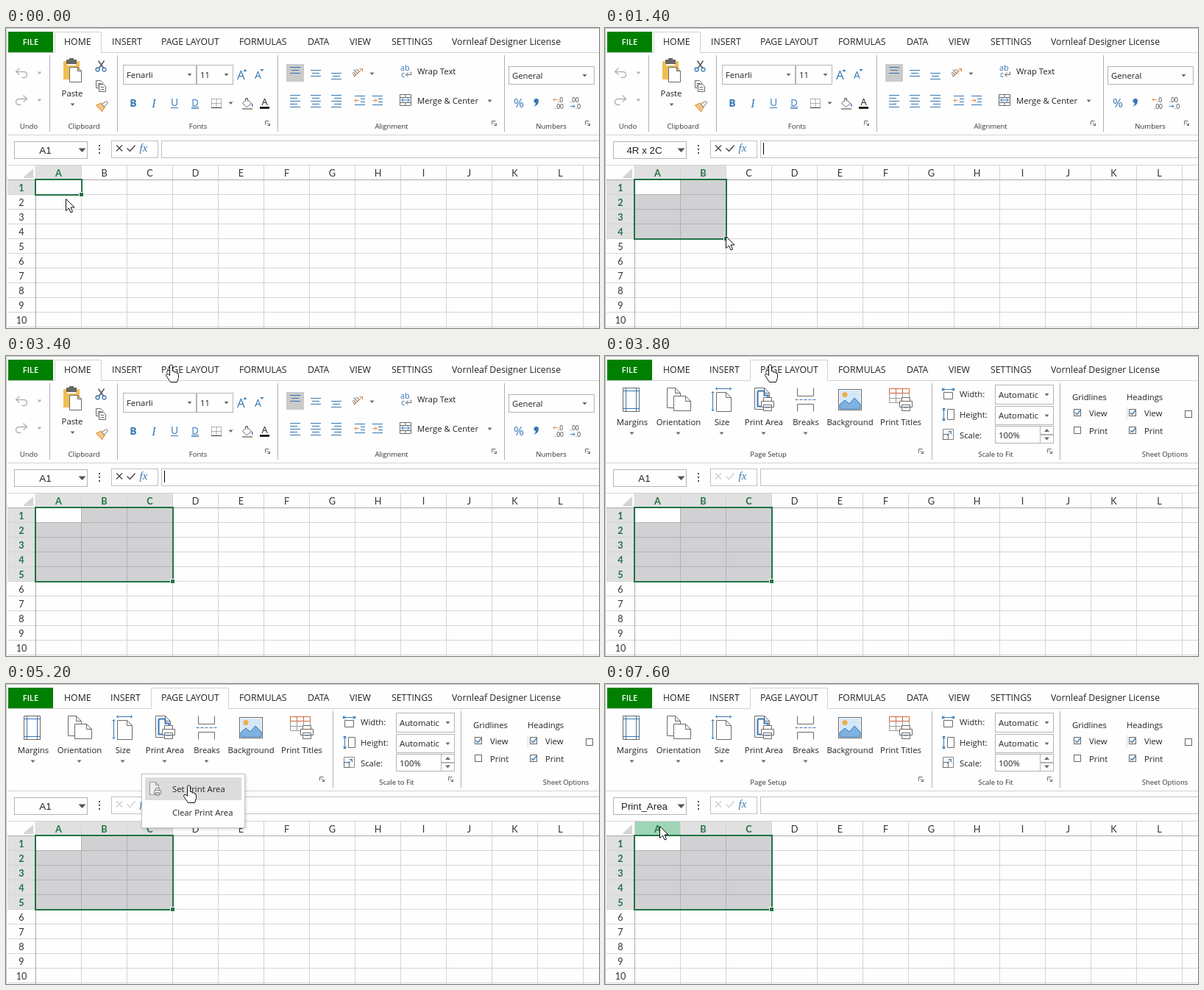
Write an HTML page with a canvas that moves like this. It is 806 px wide and 408 px high and loops after 7800 ms.

```html
<!DOCTYPE html>
<html lang="en">
<head>
<meta charset="utf-8">
<title>Spreadsheet print area</title>
<style>
html, body { margin: 0; width: 100%; height: 100%; overflow: hidden; background: #fefefe; }
canvas { display: block; }
</style>
</head>
<body>
<canvas id="stage" width="806" height="408"></canvas>
<script>
const ctx = document.getElementById('stage').getContext('2d');
const LOOP = 7800, STEP = 200;
const COL = 62, ROW = 20, LEFT = 41, TOP = 207;
const SANS = '"Open Sans", "Noto Sans", sans-serif';
const LATO = 'Lato, "Open Sans", sans-serif';
const ARIAL = '"Liberation Sans", Arial, sans-serif';
const SERIF = '"Liberation Serif", serif';
const BLUE = '#3977b4', GREY = '#6a6a6a', ORANGE = '#e58a3c', GREEN = '#217346';

// ---- helpers ----
function fill(x, y, w, h, color) {
  ctx.fillStyle = color;
  ctx.fillRect(x, y, w, h);
}
function box(x, y, w, h, stroke = '#b4b4b4', bg = '#fefefe') {
  fill(x, y, w, h, stroke);
  fill(x + 1, y + 1, w - 2, h - 2, bg);
}
function text(s, x, y, { size = 11.3, align = 'left', color = '#222', style = '', font = SANS } = {}) {
  ctx.font = `${style} ${size}px ${font}`;
  ctx.textAlign = align;
  ctx.fillStyle = color;
  ctx.fillText(s, x, Math.round(y + size * 0.357));
}
const center = (s, x, y, options) => text(s, x, y, { align: 'center', ...options });
function draw(d, x, y, stroke, bg, width = 1) {
  const path = new Path2D(d);
  ctx.save();
  ctx.translate(x, y);
  if (bg) { ctx.fillStyle = bg; ctx.fill(path); }
  if (stroke) { ctx.strokeStyle = stroke; ctx.lineWidth = width; ctx.stroke(path); }
  ctx.restore();
}
const arrowDown = (x, y, color = GREY, r = 3) => draw(`M${-r}-1.5H${r}L0 ${r - 1}Z`, x + 0.5, y, null, color);
const divider = x => fill(x, 37, 1, 104, '#b0b0b0');
const groupLabel = (s, x) => center(s, x, 134, { size: 9.5, color: '#333' });
const launcher = x => draw('M0 5V0H5M2 2L6 6M6 3V6H3', x - 3.5, 126.5, GREY);
function combo(s, x, y, w, h, inset = 10) {
  box(x, y, w, h);
  text(s, x + 5, y + h / 2);
  arrowDown(x + w - inset, y + h / 2);
}
function checkbox(x, y, checked) {
  box(x, y, 10, 10, '#666');
  if (checked) draw('M2 5L4.5 7.5L9 2', x, y, BLUE, null, 1.4);
}
const bars = (x, y, widths, align = 0, gap = 4, color = BLUE) =>
  widths.forEach((w, i) => fill(x + Math.round((14 - w) * align), Math.round(y + i * gap), w, 1, color));

// ---- ribbon ----
function tabs(layout) {
  fill(0, 0, 806, 1, '#bdbdbd');
  fill(0, 0, 1, 408, '#c4c4c4');
  fill(2, 33, 804, 1, '#d2d2d2');
  fill(3, 5, 61, 28, '#008000');
  center('FILE', 33.5, 19, { size: 11, style: '600', color: '#fff' });
  const [x, w] = layout ? [197, 106] : [66, 64];
  box(x, 5, w, 29, '#d2d2d2');
  fill(x + 1, 33, w - 2, 1, '#fefefe');
  [['HOME', 79], ['INSERT', layout ? 142 : 144], ['PAGE LAYOUT', 211], ['FORMULAS', 317], ['DATA', 410],
   ['VIEW', 467], ['SETTINGS', 524], ['Vornleaf Designer License', 606]]
    .forEach(([s, tx]) => text(s, tx, 19, { size: 12.3 }));
  fill(2, 145, 804, 1, '#d2d2d2');
}

function homeRibbon() {
  [59, 151, 369, 677].forEach(divider);
  [['Undo', 31], ['Clipboard', 106], ['Fonts', 261], ['Alignment', 524], ['Numbers', 741]]
    .forEach(g => groupLabel(...g));
  [356, 664, 791].forEach(launcher);

  // undo, redo
  draw('M5 0L0 5L5 9M0 5H10Q15 5 15 9T10 13H8', 13.5, 54.5, '#b4b4b4', null, 1.4);
  draw('M10 0L15 5L10 9M15 5H5Q0 5 0 9T5 13H7', 13.5, 91.5, '#b4b4b4', null, 1.4);
  arrowDown(45, 61, '#b4b4b4');
  arrowDown(45, 98, '#b4b4b4');

  // clipboard
  fill(78, 45, 22, 25, '#efbe55');
  fill(82, 43, 14, 6, '#666');
  fill(86, 41, 6, 3, '#666');
  fill(83, 49, 12, 2, '#fefefe');
  draw('M0 0H11L16 5V20H0ZM11 0V5H16', 86.5, 53.5, GREY, '#fefefe');
  center('Paste', 90, 89);
  arrowDown(90, 104);
  draw('M3 0L10 10M11 0L4 10', 122.5, 44.5, '#555', null, 1.5);
  draw('M5 12A2.5 2.5 0 1 1 0 12A2.5 2.5 0 1 1 5 12M14 12A2.5 2.5 0 1 1 9 12A2.5 2.5 0 1 1 14 12', 122, 44.5, BLUE, null, 1.3);
  for (const [x, y] of [[122.5, 71.5], [126.5, 76.5]])
    draw('M0 0H6L9 3V10H0ZM2 4H7M2 7H7', x, y, GREY, '#fefefe');
  draw('M0 6L7 3L12 8L8 15Z', 122.5, 99, ORANGE, '#f3c381');
  draw('M8 4L14 0L16 2L11 8Z', 122.5, 99.5, GREY, '#fefefe');

  // fonts
  combo('Fenarli', 159, 50, 100, 27);
  combo('11', 259, 50, 50, 27);
  text('A', 314, 64, { size: 17, color: BLUE });
  text('A', 338, 64, { size: 14, color: BLUE });
  draw('M-2.5 2L0-1L2.5 2Z', 325, 57, null, BLUE);
  draw('M-2.5-1L0 2L2.5-1Z', 348, 57, null, BLUE);
  const letter = { size: 14, color: BLUE };
  center('B', 173, 102, { ...letter, style: 'bold' });
  center('I', 201, 102, { ...letter, style: 'italic', font: SERIF, size: 16 });
  center('U', 229, 101, letter);
  center('D', 257, 101, { ...letter, size: 13 });
  fill(224, 108, 10, 1, BLUE);
  fill(252, 107, 10, 1, BLUE);
  fill(252, 109, 10, 1, BLUE);
  ctx.setLineDash([1, 1]);
  draw('M0 0H13V12M0 0V12M6.5 0V12M0 6H13', 279.5, 96.5, GREY);
  ctx.setLineDash([]);
  fill(279, 108, 14, 1, '#333');
  arrowDown(305, 102);
  draw('M1 7L7 1L13 7L7 12ZM5 4V0H8V4', 320.5, 95.5, GREY, '#fefefe');
  draw('M13 6Q17 10 14 12Z', 320.5, 95.5, null, BLUE);
  fill(321, 109, 14, 2, '#999');
  center('A', 351.5, 100, { size: 13 });
  fill(345, 107, 13, 3, '#222');

  // alignment
  fill(381, 49, 24, 24, '#cacaca');
  bars(386, 53, [14, 10, 14], 0.5);
  bars(414, 57, [14, 10, 14], 0.5);
  bars(442, 61, [14, 10, 14], 0.5);
  [0, 0.5, 1].forEach((a, i) => bars(386 + i * 28, 91, [14, 10, 14, 10, 14], a));
  ctx.save();
  ctx.translate(475, 62);
  ctx.rotate(-0.78);
  center('ab', 1, -2, { size: 10, color: GREY });
  ctx.restore();
  draw('M0 11L11 0M7 0H11V4', 473.5, 55.5, ORANGE);
  arrowDown(497, 62);
  for (const x of [474, 498]) {
    bars(x, 92, [14, 0, 0, 14]);
    bars(x + 8, 96, [6, 6]);
    draw(x === 474 ? 'M6 2.5H0M2.5 0L0 2.5L2.5 5' : 'M0 2.5H6M3.5 0L6 2.5L3.5 5', x, 96, ORANGE);
  }
  text('ab', 536, 54, { size: 11, color: BLUE });
  text('c', 537, 63, { size: 11, color: BLUE });
  draw('M7 0V4H0M3 1L0 4L3 7', 543.5, 59.5, GREY);
  draw('M0 0H15V15H0ZM0 4H15M0 11H15M7.5 0V4M7.5 11V15', 535.5, 90.5, GREY);
  draw('M2 7.5H13M5 5L2 7.5L5 10M10 5L13 7.5L10 10', 535.5, 90.5, BLUE);
  text('Wrap Text', 559, 59);
  text('Merge & Center', 559, 99);
  arrowDown(657, 99);

  // numbers
  combo('General', 683, 52, 117, 25, 14);
  text('%', 690, 102, { size: 17, color: BLUE });
  draw('M3 0A3 3 0 1 0 2 6Q2 9-1 11Q6 9 6 3Q6 0 3 0Z', 718, 96, null, BLUE);
  [744, 767].forEach((x, i) => {
    text(i ? '.00' : '.0', x + (i ? 0 : 6), 98, { size: 8.5, color: '#333' });
    text(i ? '.0' : '.00', x + (i ? 7 : 2), 107, { size: 8.5, color: '#333' });
    draw(i ? 'M0 2H6M4 0L6 2L4 4' : 'M6 2H0M2 0L0 2L2 4', x, i ? 104.5 : 95.5, i ? BLUE : ORANGE);
  });
}

const sheet = (x, y, w, h, f = 7) => draw(`M0 0H${w - f}L${w} ${f}V${h}H0ZM${w - f} 0V${f}H${w}`, x, y, GREY, '#fefefe');

function printer(x, y) {
  draw('M0 5H17V13H0ZM3 5V0H14V5M3 10H14V18H3Z', x, y, GREY, '#fefefe');
  fill(x + 5.5, y + 13, 6, 1, BLUE);
}

function layoutRibbon() {
  [444, 618].forEach(divider);
  [['Page Setup', 222], ['Scale to Fit', 531], ['Sheet Options', 761]].forEach(g => groupLabel(...g));
  [430, 605].forEach(launcher);
  [['Margins', 37], ['Orientation', 100], ['Size', 159], ['Print Area', 216], ['Breaks', 273],
   ['Background', 333], ['Print Titles', 402]].forEach(([s, x], i) => {
    center(s, x, 90);
    if (i < 5) arrowDown(x - 1, 105);
  });

  // margins, orientation, size
  draw('M0 0H22V32H0Z', 24.5, 43.5, GREY);
  draw('M4 0V32M18 0V32M0 4H22M0 28H22', 24.5, 43.5, BLUE);
  sheet(84.5, 43.5, 18, 27);
  sheet(93.5, 54.5, 23, 20);
  sheet(151.5, 49.5, 20, 26);
  draw('M6 2H27M8 0L6 2L8 4M25 0L27 2L25 4M2 6V32M0 8L2 6L4 8M0 30L2 32L4 30', 144.5, 42.5, BLUE);

  // print area, breaks
  sheet(203.5, 43.5, 20, 29);
  draw('M4 4H13V10H18V16M4 4V25H9', 203.5, 43.5, BLUE, null, 2);
  printer(212.5, 56.5);
  draw('M3 0V11H25V0M3 32V22H25V32', 258.5, 43.5, GREY);
  ctx.setLineDash([4, 2]);
  draw('M0 16H29', 258.5, 43.5, BLUE);
  ctx.setLineDash([]);

  // background picture, print titles
  box(317, 45, 32, 29, GREY);
  box(319, 47, 28, 25, '#d5e8f8', '#d5e8f8');
  draw('M0 22V16L7 10L13 15L20 7L28 15V22Z', 319, 50, BLUE, '#7fb2e0');
  draw('M4 0A3.5 3.5 0 1 0 4 7A3.5 3.5 0 1 0 4 0', 322, 49, null, '#efad4c');
  draw('M0 0H27V19H0ZM0 6H27M0 13H27M9 0V19M18 0V19', 386.5, 44.5, '#999');
  draw('M0 0H27V6H0ZM9 0V6M18 0V6', 386.5, 44.5, '#d0693f');
  printer(400.5, 56.5);

  // scale to fit
  draw('M0 0V4M16 0V4M0 2H16M3 0L0 2L3 4M13 0L16 2L13 4', 458.5, 43.5, BLUE);
  draw('M2 7H14V16H2Z', 458.5, 42.5, GREY);
  draw('M0 0H4M0 16H4M2 0V16M0 3L2 0L4 3M0 13L2 16L4 13', 458.5, 71.5, BLUE);
  draw('M7 1H16V15H7Z', 458.5, 71.5, GREY);
  draw('M0 0H14V14H0Z', 459.5, 99.5, '#888');
  draw('M0 7H7V14H0Z', 459.5, 99.5, GREY);
  draw('M5 9L11 3M7 3H11V7', 459.5, 99.5, BLUE);
  ['Width:', 'Height:', 'Scale:'].forEach((s, i) => text(s, 482, 52 + 28 * i));
  combo('Automatic', 530, 39, 80, 27);
  combo('Automatic', 530, 68, 80, 26);
  box(530, 95, 80, 24);
  text('100%', 535, 108);
  box(591, 95, 19, 12);
  box(591, 107, 19, 12);
  draw('M-3.5 2H3.5L0-2Z', 600.5, 101, null, GREY);
  arrowDown(600, 112, GREY, 3.5);

  // sheet options
  text('Gridlines', 635, 56);
  text('Headings', 709, 56);
  for (const x of [637, 712]) {
    checkbox(x, 72, true);
    checkbox(x, 96, x === 712);
    text('View', x + 21, 78);
    text('Print', x + 21, 102);
  }
  fill(709, 70, 1, 16, '#d6d6d6');
  checkbox(788, 74, false);
}

// ---- formula bar and grid ----
function formulaBar(name, layout, caret) {
  box(11, 154, 100, 24);
  center(name, 53.5, 166, { size: 13.33, font: ARIAL });
  arrowDown(103, 165, '#555', 5);
  [159, 164, 169].forEach(y => fill(126, y, 2, 2, '#555'));
  box(143, 153, 64, 24, '#c0c0c0');
  const ink = layout ? '#cfcfcf' : '#444';
  draw('M0 0L8 8M8 0L0 8', 150, 159.5, ink, null, 1.3);
  draw('M0 4L4 8L11 0', 164.5, 159.5, ink, null, 1.4);
  center('fx', 187, 163, { size: 15, style: 'italic', font: SERIF, color: BLUE });
  box(211, 153, 600, 24, '#c0c0c0');
  if (caret) fill(215, 156, 1, 16, '#000');
}

function grid(cols, rows, hover) {
  draw('M14 0V13H0Z', 23, 191, null, '#d4d4d4');
  fill(LEFT, 187, COL * cols, 19, '#e0e0e0');
  fill(2, TOP, 38, ROW * rows, '#e0e0e0');
  if (hover) fill(LEFT, 187, COL - 1, 19, '#9fd5b7');
  fill(LEFT, TOP, COL * cols, ROW * rows, '#d1d1d3');
  for (let x = 40; x < 806; x += COL) fill(x, 187, 1, 221, '#d4d4d4');
  for (let y = 226; y < 408; y += ROW) fill(2, y, 804, 1, '#d4d4d4');
  for (let c = 1; c < cols; c++) fill(40 + COL * c, TOP, 1, ROW * rows, '#b2b2b4');
  for (let r = 1; r < rows; r++) fill(LEFT, 206 + ROW * r, COL * cols, 1, '#b2b2b4');
  fill(LEFT, TOP, COL - 1, ROW - 1, '#fefefe');
  fill(2, 186, 804, 1, '#d4d4d4');
  fill(2, 206, 804, 1, '#ababab');
  fill(40, TOP, 1, 201, '#ababab');
  const header = on => ({ size: 12.7, font: LATO, color: on ? GREEN : '#333', style: on ? 'bold' : '' });
  for (let c = 0; c < 12; c++) center('ABCDEFGHIJKL'[c], 71.5 + COL * c, 197.5, header(c < cols));
  for (let r = 0; r < 10; r++) center(r + 1, 21, 217.5 + ROW * r, header(r < rows));
  ctx.strokeStyle = GREEN;
  ctx.lineWidth = 2;
  ctx.strokeRect(LEFT - 1, TOP - 1, COL * cols + 1, ROW * rows + 1);
  box(LEFT + COL * cols - 4, TOP + ROW * rows - 4, 7, 7, '#fefefe', GREEN);
}

function menu(y) {
  ctx.save();
  ctx.shadowColor = '#0003';
  ctx.shadowBlur = 4;
  ctx.shadowOffsetX = ctx.shadowOffsetY = 1;
  fill(184, 122, 141, 74, '#c6c6c6');
  ctx.restore();
  fill(185, 123, 139, 72, '#fefefe');
  if (y > 126 && y < 159) fill(189, 127, 131, 31, '#dcdcdc');
  draw('M0 0H8L12 4V17H0ZM8 0V4H12', 195.5, 133.5, '#999', '#eee');
  draw('M0 3H9V8H0ZM2 3V0H7V3M2 6H7V10H2Z', 201.5, 141.5, '#888', '#eee');
  text('Set Print Area', 226, 143);
  text('Clear Print Area', 226, 175);
}

// ---- pointer ----
const POINTERS = {
  arrow: 'M0 0V16L4 12.5L6.5 18.5L9 17.5L6.5 11.5H11.5Z',
  hand: 'M-2 0Q-2-1.5 0-1.5T2 0V7Q5 6 5 9Q8 7 8 10Q10 9 10 12V16L8 22H-1L-7 13Q-7 10-4 11L-2 13Z',
  resize: 'M0-11L4-7H1V7H4L0 11L-4 7H-1V-7H-4Z'
};
const ROUTE = [ // time, x, y
  [0, 81, 232], [400, 73, 218], [800, 73, 218], [1400, 164, 283], [2000, 212, 298], [2600, 217, 300],
  [2800, 217, 300], [3400, 224, 13], [3800, 224, 13], [4400, 216, 92], [4600, 216, 92], [5200, 248, 139],
  [5400, 248, 139], [6200, 58, 177], [6400, 52, 180], [7200, 56, 182], [7600, 74, 193]
];
function pointerAt(t) {
  const i = Math.max(1, ROUTE.findIndex(p => p[0] >= t));
  const [t0, x0, y0] = ROUTE[i - 1], [t1, x1, y1] = ROUTE[i];
  const k = (t - t0) / (t1 - t0);
  return [Math.round(x0 + (x1 - x0) * k), Math.round(y0 + (y1 - y0) * k)];
}

function render(t) {
  const [x, y] = pointerAt(t);
  const [dragX, dragY] = pointerAt(Math.min(t, 2600));
  const dragging = t >= 800;
  const cols = dragging ? Math.floor((dragX - 42) / COL) + 1 : 1;
  const rows = dragging ? Math.floor((dragY - TOP) / ROW) + 1 : 1;
  const layout = t >= 3800;
  const name = t >= 5400 ? 'Print_Area' : t < 2800 && cols * rows > 1 ? `${rows}R x ${cols}C` : 'A1';

  fill(0, 0, 806, 408, '#fefefe');
  tabs(layout);
  layout ? layoutRibbon() : homeRibbon();
  formulaBar(name, layout, t >= 600 && !layout);
  grid(cols, rows, t >= 7400 && y > 186);
  if (t >= 4600 && t < 5400) menu(y);
  const kind = t >= 3400 && t < 5800 ? 'hand' : t >= 6200 && t < 7400 ? 'resize' : 'arrow';
  draw(POINTERS[kind], x + 0.5, y + 0.5, '#111', '#fff');
}

function tick() {
  render(Math.floor(performance.now() % LOOP / STEP) * STEP);
  requestAnimationFrame(tick);
}
tick();
</script>
</body>
</html>
```
